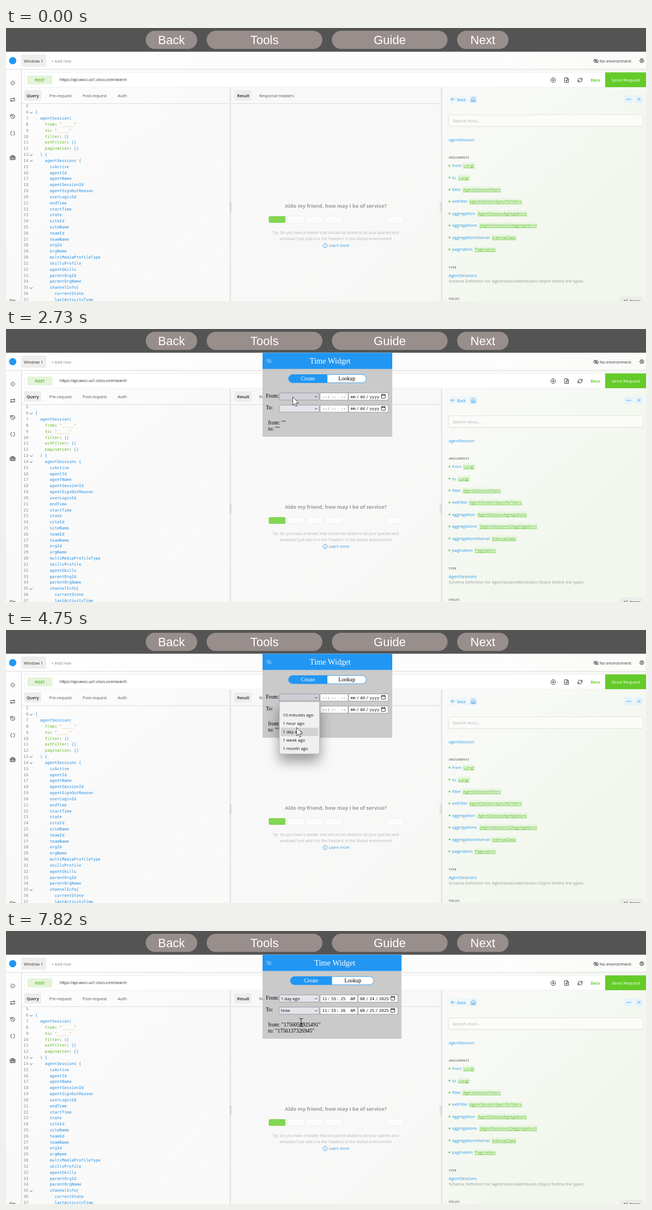
An HTML page that plays this animation: 1145 px wide and 489 px high, repeating every 8000 ms.

```html
<!DOCTYPE html>
<html lang="en">
<head>
<meta charset="utf-8">
<title>Time widget demo</title>
<style>
html, body { margin: 0; width: 100%; height: 100%; overflow: hidden; background: #fafafa; }
svg { display: block; width: 100vw; height: 100vh; }
text { font-family: "Open Sans", "Noto Sans", sans-serif; white-space: pre; }
.nav { font-family: "Liberation Sans", Arial, sans-serif; }
.serif { font-family: "Liberation Serif", "Times New Roman", serif; }
.mono { font-family: "DejaVu Sans Mono", monospace; }
.bold { font-weight: 700; }
.semi { font-weight: 600; }
.mid { text-anchor: middle; }
.end { text-anchor: end; }
</style>
</head>
<body>
<svg id="stage" viewBox="0 0 1145 489">
  <defs>
    <linearGradient id="page" x1="0" y1="0" x2="1" y2="0.45">
      <stop offset="0" stop-color="#fefefe"/>
      <stop offset="0.35" stop-color="#f9f9f9"/>
      <stop offset="0.7" stop-color="#f9faf8"/>
      <stop offset="1" stop-color="#f2f7ee"/>
    </linearGradient>
  </defs>
  <g id="base"></g>
  <g id="menu"></g>
  <g id="widget"></g>
  <g id="popup"></g>
  <g id="cursor"></g>
</svg>
<script>
const LOOP = 8000;
const BLUE = '#2196f3', LINK = '#2a9be8', GREEN = '#64cb29', INK = '#333', PILL = '#988e8c';
const $ = id => document.getElementById(id);

const text = (x, y, s, size = 7.45, fill = INK, cls = '') =>
  `<text x="${x}" y="${y}" font-size="${size}" fill="${fill}" class="${cls}">${s}</text>`;
const rect = (x, y, w, h, fill, r = 0, extra = '') =>
  `<rect x="${x}" y="${y}" width="${w}" height="${h}" rx="${r}" fill="${fill}" ${extra}/>`;
const path = (d, stroke, width = 1, fill = 'none') =>
  `<path d="${d}" stroke="${stroke}" stroke-width="${width}" fill="${fill}" stroke-linecap="round" stroke-linejoin="round"/>`;
// Icons are drawn on a 24 unit grid.
const icon = (cx, cy, d, color = '#222', size = 10, width = 2) =>
  `<g transform="translate(${cx - size / 2} ${cy - size / 2}) scale(${size / 24})">${path(d, color, width)}</g>`;
const chevron = (x, y, color = INK) => path(`M${x - 2} ${y - 1}l2 2l2 -2`, color, 0.9);

const EYE_OFF = 'M2 12c3 -9 17 -9 20 0c-3 9 -17 9 -20 0M15 12a3 3 0 1 1 -6 0a3 3 0 1 1 6 0M3 3l18 18';
const PLUS_RING = 'M12 2a10 10 0 1 0 .01 0M12 7v10M7 12h10';
const FILE_PLUS = 'M4 2h11l5 5v15h-16zM14 2v6h6M12 10v8M8 14h8';
const REFRESH = 'M3 12a9 9 0 0 1 15 -6l3 3M21 3v6h-6M21 12a9 9 0 0 1 -15 6l-3 -3M3 21v-6h6';
const REPEAT = 'M3 11v-4h18M17 3l4 4l-4 4M21 13v4h-18M7 21l-4 -4l4 -4';
const HISTORY = 'M3 12a9 9 0 1 0 3 -7l-3 3M3 3v5h5M12 7v5l4 2';
const BRACES = 'M8 3c-5 0 -1 7 -5 9c4 2 0 9 5 9M16 3c5 0 1 7 5 9c-4 2 0 9 -5 9';
const CASE = 'M2 7h20v14h-20zM8 7v-4h8v4M2 13h20M8 7v14M16 7v14';
const FOLDER = 'M2 4h7l3 3h10v14h-20z';
const SPOKES = 'M12 2v5M12 17v5M2 12h5M17 12h5M5 5l3 3M16 16l3 3M5 19l3 -3M16 8l3 -3';
const HOME = 'M3 10l9 -8l9 8v12h-18zM9 22v-9h6v9';
const COG = 'M12 3l2 3l4 -1l0 4l4 3l-4 3l0 4l-4 -1l-2 3l-2 -3l-4 1l0 -4l-4 -3l4 -3l0 -4l4 1zM15 12a3 3 0 1 1 -6 0a3 3 0 1 1 6 0';

function navBar() {
  const pills = [['Back', 250, 92], ['Tools', 359, 207], ['Guide', 583, 207], ['Next', 807, 92]];
  return rect(0, 0, 1145, 42.5, '#545454') + pills.map(([s, x, w]) =>
    rect(x, 5, w, 32.5, PILL, 16.2) + text(x + w / 2, 29, s, 21.6, '#fff', 'nav mid')).join('');
}

function header() {
  return rect(0, 42.5, 1145, 31.5, '#fff', 0, 'opacity=".45"') + rect(0, 73.5, 1145, 1, '#dcdcdc') +
    `<circle cx="12" cy="58.5" r="6.5" fill="${BLUE}"/>` +
    rect(27, 47.5, 45, 22, '#eeeeed', 2) + text(32, 61.8, 'Window 1') +
    text(81, 61.8, '+ Add new', 7.3, '#888') +
    icon(1055.5, 59, EYE_OFF) + text(1062, 61.8, 'No environment') + icon(1137.5, 58.5, COG);
}

function sidebar() {
  const items = [[98.5, SPOKES], [128.5, REPEAT], [158.5, HISTORY], [188.5, BRACES], [232, CASE], [490, FOLDER]];
  return rect(27, 74, 1, 415, '#d4d4d4') + items.map(([y, d]) => icon(12, y, d)).join('');
}

function urlBar() {
  return rect(33, 79.5, 1112, 26.5, '#fff', 2, 'stroke="#ececec" stroke-width=".8"') +
    rect(38, 85, 45, 16, '#e3f4d9', 2) + text(60.5, 96, 'POST', 6.8, '#5fbf2a', 'mid bold') +
    text(96, 95.4, 'https://api.wxcc-us1.cisco.com/search', 6.83, '#222') +
    icon(979, 93.3, PLUS_RING) + icon(1003, 93.3, FILE_PLUS) + icon(1027, 93.3, REFRESH) +
    text(1046, 96, 'Docs', 6.9, '#5fc327', 'bold') +
    rect(1072, 79.5, 73, 26.5, GREEN) + text(1109, 96.2, 'Send Request', 8, '#fff', 'mid');
}

function panels() {
  const grip = x => Array.from({ length: 16 }, (_, i) =>
    rect(x + (i % 2) * 2, 313 + (i >> 1) * 2.2, 0.9, 0.9, '#999')).join('');
  return rect(404, 107, 372, 382, '#f8f8f8', 0, 'opacity=".7"') +
    rect(400.5, 107, 3.6, 382, '#f3f3f3') + rect(776, 107, 3.6, 382, '#f3f3f3') +
    [400.3, 779.3].map(x => rect(x, 107, 0.9, 382, '#cdcdcd')).join('') +
    rect(27, 135, 373, 0.8, '#d8d8d8') + rect(404, 135, 372, 0.8, '#d8d8d8') +
    rect(32.5, 111.5, 30.5, 18.5, '#ededed', 2) + rect(408, 111.5, 31, 18.5, '#ededed', 2) +
    text(37, 123.8, 'Query', 7.4, '#222', 'semi') + text(77.5, 123.8, 'Pre-request', 7.4, '#555') +
    text(137, 123.8, 'Post-request', 7.3, '#555') + text(200, 123.8, 'Auth', 7.4, '#555') +
    text(413.5, 123.8, 'Result', 7.3, '#222', 'semi') + text(453, 123.8, 'Response headers', 7.3, '#555') +
    grip(400.6) + grip(776.4);
}

const CODE = `
{
  agentSession(
    from: "_____"
    to: "_____"
    filter: {}
    extFilter: {}
    pagination: {}
  ) {
    agentSessions {
      isActive
      agentId
      agentName
      agentSessionId
      agentSignOutReason
      userLoginId
      endTime
      startTime
      state
      siteId
      siteName
      teamId
      teamName
      orgId
      orgName
      multiMediaProfileType
      skillsProfile
      agentSkills
      parentOrgId
      parentOrgName
      channelInfo{
        currentState
        lastActivityTime`.split('\n');

function editor() {
  const span = (s, fill) => `<tspan fill="${fill}">${s}</tspan>`;
  const folds = [6, 13, 14, 35];
  return CODE.map((line, i) => {
    const n = i + 5, y = 142.4 + i * 10.83;
    const body = line.trimStart(), x = 52.3 + (line.length - body.length) * 4.33;
    const arg = body.match(/^(\w+)(: )(.+)$/);
    const inner = arg
      ? span(arg[1], '#62b81f') + span(arg[2], INK) + span(arg[3], arg[3][0] === '"' ? '#d39a1e' : LINK)
      : body;
    return text(40, y, n, 7.2, '#8a8a8a', 'mono end') + text(x, y, inner, 7.2, '#2390e6', 'mono') +
      (folds.includes(n) ? chevron(45, y - 1.5, '#444') : '');
  }).join('');
}

function result() {
  const chip = x => rect(x, 337, 30.5, 12, '#fcfcfc', 2, 'stroke="#ececec" stroke-width=".8"');
  return text(590, 321.5, 'Aldo my friend, how may I be of service?', 9.1, '#9b9b9b', 'mid bold') +
    rect(470, 337, 30, 12, '#83d654', 2) + [503.5, 537.5, 571.5, 680.5].map(chip).join('') +
    text(590, 369, 'Tip: Do you have a header that should be added to all your queries and', 6.84, '#b3b3b3', 'mid') +
    text(590, 380.3, "windows? Just add it to the 'headers' in the Global environment", 6.84, '#b3b3b3', 'mid') +
    icon(571, 389.7, 'M12 2a10 10 0 1 0 .01 0M12 11v6M12 7v.1', LINK, 9.5) +
    text(577.5, 392.2, 'Learn more', 6.84, LINK);
}

function docs() {
  const args = [
    ['from', 'Long!', 818.5], ['to', 'Long!', 809.3], ['filter', 'AgentSessionFilters', 817.5],
    ['extFilter', 'AgentSessionSpecificFilters', 829], ['aggregation', 'AgentSessionAgregations', 844],
    ['aggregations', '[AgentSessionV2Aggregation]', 847.5], ['aggregationInterval', 'IntervalData', 869.5],
    ['pagination', 'Pagination', 839]];
  const chip = x => rect(x, 120.5, 15, 14.5, '#e6f2fa', 2);
  const title = (y, s) => text(792, y, s, 5.8, '#888', 'bold');
  return rect(793, 120.5, 33, 14.5, '#eff6fa', 2) + chip(828.5) + chip(1106.5) + chip(1125) +
    icon(799.5, 127.7, 'M21 12h-18M11 4l-8 8l8 8', LINK, 8.5, 2.4) + text(807, 130.6, 'Back', 7.2, LINK) +
    icon(836, 127.7, HOME, LINK, 9.5) + icon(1132.5, 127.7, 'M5 5l14 14M19 5l-14 14', LINK, 8, 2.6) +
    [1111, 1114, 1117].map(x => `<circle cx="${x}" cy="127.8" r=".9" fill="${LINK}"/>`).join('') +
    rect(792, 155.5, 348, 20.5, '#fbfcfa', 2, 'stroke="#e0e4dd" stroke-width=".9"') +
    rect(793, 176.3, 346, 1, '#e6e9e4') + text(799, 168.8, 'Search docs...', 7.9, '#b0b0b0') +
    text(792, 202.8, 'agentSession', 7.45, LINK) + title(234.2, 'ARGUMENTS') +
    args.map(([name, type, x], i) => {
      const y = 249.2 + i * 21.43;
      return rect(792, y - 4, 2.6, 2.6, '#63c72b') + text(798, y, name, 7.45, LINK) +
        text(x, y, type, 7.45, '#55c01f', 'type');
    }).join('') +
    title(431, 'TYPE') + text(792, 445.6, 'AgentSessions', 7.45, LINK) +
    text(792, 456, 'Schema Definition for AgentSessionAttributes Object Define the types', 7.45, '#999') +
    title(487.4, 'FIELDS') + rect(1097, 481, 43, 16, '#ececea', 2) +
    icon(1109, 490, 'M10 4h12M10 11h9M10 18h6M4 20v-16M1 7l3 -3l3 3', INK, 8) + text(1116, 492, 'None', 7.2, INK, 'semi');
}

// Tinted boxes and underlines follow the measured width of each type name.
function decorateTypes() {
  document.querySelectorAll('.type').forEach(el => {
    const x = +el.getAttribute('x'), y = +el.getAttribute('y'), w = el.getComputedTextLength();
    el.insertAdjacentHTML('beforebegin',
      rect(x - 1.5, y - 8, w + 3, 11, '#e8f5e0', 1) + rect(x, y + 1, w, 0.7, '#55c01f'));
  });
}

function toolsMenu(lit) {
  const items = ['Time Widget', 'Toggle Video', 'Authorization'];
  return rect(359, 5, 207.5, 98, PILL, 17) + text(462.5, 29, 'Tools', 21.6, '#fff', 'nav mid') +
    (lit ? rect(359, 34, 207.5, 23, BLUE) : '') +
    items.map((s, i) => text(462.7, 52.3 + i * 22.8, s, 19.3, '#fff', 'nav mid')).join('');
}

function fieldRow(y, x, value, time, date, hover) {
  const edge = 'stroke="#8f8f9d" stroke-width=".8"';
  const tx = x + 73.2, tw = time ? 67 : 50, dx = tx + tw + 1, base = y + 9.2;
  const mono = (px, s) => text(px, base, s, 7.2, '#111', 'mono');
  const parts = (px, list) => list.map(([o, s]) => mono(px + o, s)).join('');
  const clock = time
    ? [[4, time[0]], [13.2, ':'], [20, time[1]], [29.2, ':'], [36.7, time[2]], [54, time[3]]]
    : [[4, '--'], [13.2, ':'], [20, '--'], [37.5, '--']];
  const [m, d, yr] = date || ['mm', 'dd', 'yyyy'], cx = dx + 62;
  return rect(x, y, 71.5, 12.8, hover ? '#d0d0d7' : '#e4e4ea', 2, edge) + chevron(x + 66, y + 6.8) +
    text(x + 3, base, value, 7.6, '#111') +
    rect(tx, y, tw, 12.8, '#fff', 0, edge) + parts(tx, clock) +
    rect(dx, y, 71, 12.8, '#fff', 0, edge) +
    parts(dx, [[3.5, m], [14, '/'], [20.5, d], [31, '/'], [37.5, yr]]) +
    rect(cx - 3.5, y + 3, 7, 6.5, 'none', 0.8, 'stroke="#222" stroke-width=".9"') +
    path(`M${cx - 3.5} ${y + 4.4}h7M${cx - 2} ${y + 2}v1M${cx + 2} ${y + 2}v1`, '#222', 0.9);
}

function timeWidget(from, to, hover) {
  const w = from ? 248.5 : 232, cx = 459 + w / 2, pw = w * 0.6, px = cx - pw / 2;
  const serif = (x, y, s) => text(x, y, s, 9.6, '#000', 'serif');
  return rect(459, 42.5, w, 150.5, '#cacaca') + rect(459, 42.5, w, 29, BLUE) +
    icon(470.5, 57.2, EYE_OFF, '#a5cdec', 11, 1.8) + text(cx + 5, 62, 'Time Widget', 14.1, '#fff', 'serif mid') +
    rect(px, 81.6, pw, 14.6, '#fff', 7.3, `stroke="${BLUE}" stroke-width=".8"`) +
    `<path d="M${cx} 81.6H${px + 7.3}a7.3 7.3 0 0 0 0 14.6H${cx}z" fill="${BLUE}"/>` +
    text(cx - pw / 4, 92.2, 'Create', 9.6, '#fff', 'serif mid') +
    text(cx + pw / 4, 92.2, 'Lookup', 9.6, '#000', 'serif mid') +
    serif(465, 123, 'From:') + serif(465, 144.4, 'To:') +
    fieldRow(114.5, 488.8, from ? '1 day ago' : '', from && ['11', '55', '25', 'AM'], from && ['08', '24', '2025'], hover === 1) +
    fieldRow(136.2, from && !to ? 505.6 : 488.8, to ? 'Now' : '', to && ['11', '55', '26', 'AM'], to && ['08', '25', '2025'], hover === 2) +
    serif(469, 171, `from: "${from ? '1756050925491' : ''}"`) +
    serif(469, 181.8, `to: "${to ? '1756137326945' : ''}"`);
}

const AGO = ['10 minutes ago', '1 hour ago', '1 day ago', '1 week ago', '1 month ago'];
const FROM_LIST = ['', ...AGO], TO_LIST = ['', 'Now', ...AGO.slice(0, 4)];

function optionList(x, y, list, lit) {
  return `<g style="filter:drop-shadow(0 13px 11px rgba(0,0,0,.38))">` +
    rect(x, y, 72, 94, '#f0f0f0', 3, 'stroke="#a9a9a9" stroke-width=".8"') + '</g>' +
    rect(x + 2.5, y + 2 + lit * 15, 67, 15, '#d3d3d3', 1.5) +
    list.map((s, i) => text(x + 6.3, y + 27.4 - 15 + i * 15, s, 7.65, '#111')).join('');
}

// Pointer path: time, x, y.
const KEYS = [
  [460, 560, 489], [1200, 480, 36], [1340, 478, 22], [1530, 478, 22], [1540, 479, 21],
  [1680, 479, 21], [1940, 478, 42], [2470, 478, 42], [2730, 513, 122], [2810, 513, 122],
  [3150, 524, 119], [3500, 524, 119], [3820, 525, 139], [3890, 525, 139], [4150, 524, 147],
  [4220, 524, 147], [4750, 520, 175], [5229, 520, 175], [5230, 520, 178], [5820, 520, 178],
  [6040, 536, 138], [6500, 536, 138], [6890, 537, 170], [7360, 537, 170], [7820, 528, 164]];
const CLICKS = [[2200, 2330], [3360, 3500], [5690, 5760], [6360, 6430], [7090, 7220]];
const within = (t, a, b) => t >= a && t < b;

function pointerAt(t) {
  const i = KEYS.findIndex(k => k[0] > t);
  if (i < 0) return KEYS[KEYS.length - 1].slice(1);
  if (i === 0) return KEYS[0].slice(1);
  const [t0, x0, y0] = KEYS[i - 1], [t1, x1, y1] = KEYS[i];
  const u = (t - t0) / (t1 - t0), e = u * u * (3 - 2 * u);
  return [x0 + (x1 - x0) * e, y0 + (y1 - y0) * e];
}

const SHAPES = {
  arrow: path('M0 0v14.5l3.3 -3l2.3 5.3l2.3 -1l-2.3 -5.1h4.6z', '#222', 0.8, '#fff'),
  hand: path('M-1 0q1.2 -1.4 2.4 0v5l5.2 1.2q1.6 .6 1.2 2.6l-1 5.2h-6.4l-4.4 -6q.6 -1.6 3 .4z', '#222', 0.8, '#fff'),
  beam: path('M-3 -7.5q3 0 3 1.5q0 -1.5 3 -1.5M0 -6v12M-3 7.5q3 0 3 -1.5q0 1.5 3 1.5M-1.5 1.5h3', '#222', 1)
};

function drawPointer(t, x, y) {
  if (t < 460) return '';
  const kind = within(t, 1270, 2330) ? 'hand' : t >= 7220 ? 'beam' : 'arrow';
  const ring = CLICKS.some(([a, b]) => within(t, a, b))
    ? '<circle r="10" fill="#d2cd2c" fill-opacity=".72"/>' : '';
  return `<g transform="translate(${x.toFixed(2)} ${y.toFixed(2)})">${ring}${SHAPES[kind]}</g>`;
}

const shown = {};
function show(id, html) {
  if (shown[id] === html) return;
  shown[id] = html;
  $(id).innerHTML = html;
}

function draw(t) {
  const [x, y] = pointerAt(t);
  const openFrom = within(t, 3430, 5760), openTo = within(t, 6430, 7220);
  const hover = openFrom || (x > 489 && x < 560 && within(y, 114.5, 127.3) && t < 5760) ? 1
    : openTo || (t >= 5760 && t < 7220 && x > 505 && within(y, 136, 149)) ? 2 : 0;
  show('menu', within(t, 1270, 2470) ? toolsMenu(y > 34) : '');
  show('widget', t >= 2330 ? timeWidget(t >= 5760, t >= 7220, hover) : '');
  const top = openFrom ? 128 : 149.6;
  const lit = Math.max(0, Math.min(5, Math.floor((y - top - 2) / 15)));
  show('popup', openFrom ? optionList(489, top, FROM_LIST, lit) : openTo ? optionList(505.5, top, TO_LIST, lit) : '');
  $('popup').setAttribute('opacity', Math.min(1, (t - (openFrom ? 3430 : 6430)) / 150 + 0.3));
  show('cursor', drawPointer(t, x, y));
}

$('base').innerHTML = rect(0, 0, 1145, 489, 'url(#page)') + header() + sidebar() + urlBar() +
  panels() + editor() + result() + docs() + navBar();
decorateTypes();

const start = performance.now();
function tick() {
  draw((performance.now() - start) % LOOP);
  requestAnimationFrame(tick);
}
tick();
</script>
</body>
</html>
```
